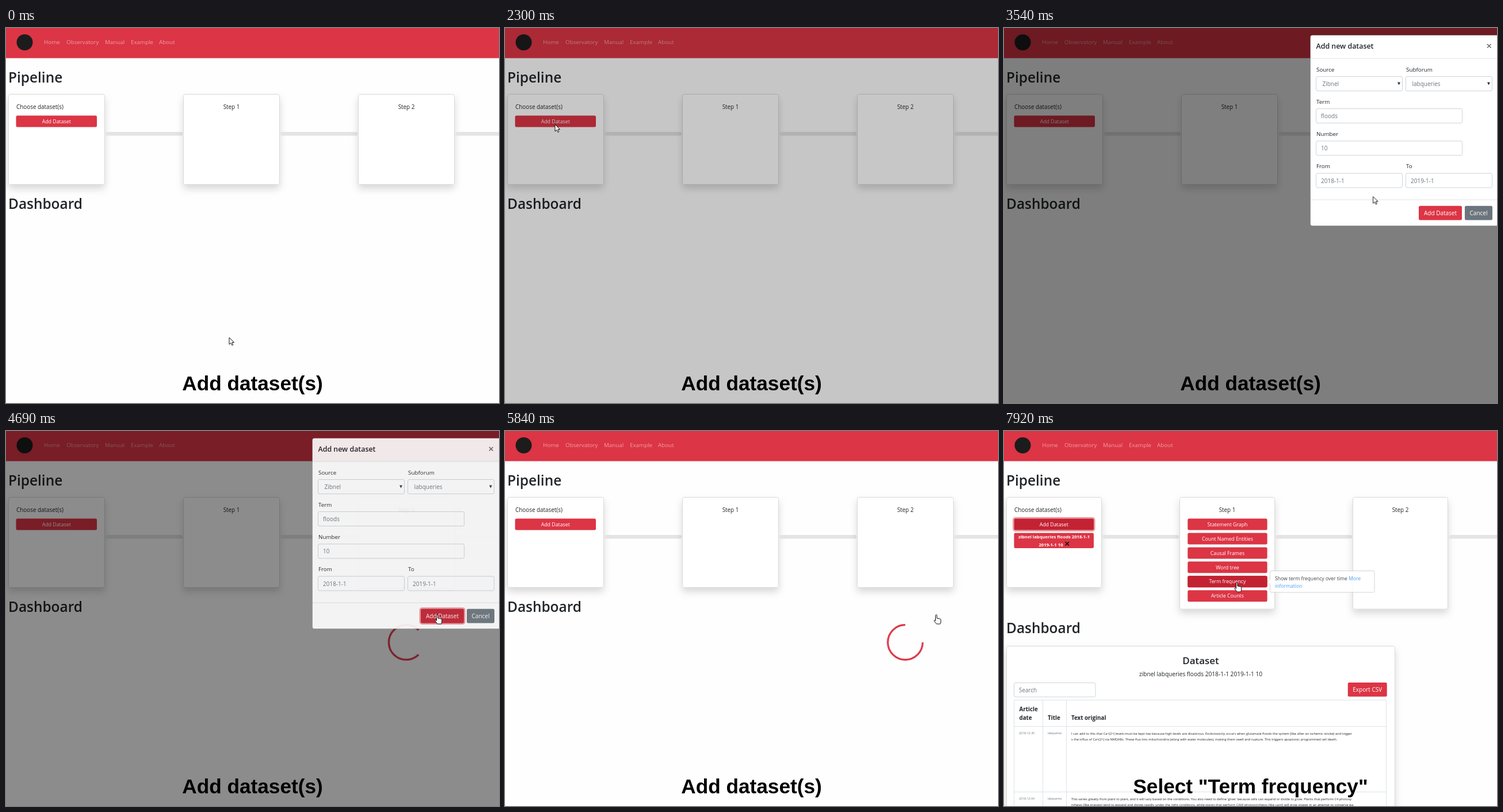
Write an HTML page that moves like this. It is 857 px wide and 653 px high and loops after 8 s.

```html
<!DOCTYPE html>
<html lang="en">
<head>
<meta charset="utf-8">
<title>Add dataset(s)</title>
<style>
  html, body { margin: 0; width: 100%; height: 100%; overflow: hidden; background: #fefefe; }
  svg { display: block; width: 100vw; height: 100vh; font-family: 'Open Sans', 'Noto Sans', sans-serif; }
  text { fill: #212529; white-space: pre; }
  .mid { text-anchor: middle; }
  .semi { font-weight: 600; }
  .bold { font-weight: 700; }
  .light { fill: #fff; }
  .muted { fill: #6c757d; }
  .link { fill: #2b8fee; }
  .nav { fill: #fff; fill-opacity: .52; }
  .caption { font: bold 35.2px 'Liberation Sans', Arial, sans-serif; fill: #000; text-anchor: middle; }
  .box { fill: #fff; stroke: #ced4da; }
  .rule { fill: none; stroke: #dee2e6; }
  .red { fill: #dc3545; }
  .dark { fill: #c32232; }
  .ring { fill: none; stroke: #dc3545; stroke-opacity: .5; stroke-width: 2.6; }
  .pointer { fill: #fff; stroke: #111; stroke-width: 1; stroke-linejoin: round; }
</style>
</head>
<body>
<script>
const LOOP = 8000;
const SITE = 'Zibnel', BOARD = 'labqueries';
const QUERY = `${SITE.toLowerCase()} ${BOARD} floods 2018-1-1`;

const text = (str, x, y, size, cls = '') =>
  `<text x="${x}" y="${y}" font-size="${size}" class="${cls}">${str}</text>`;
const rect = (x, y, w, h, cls, r = 2.5) =>
  `<rect x="${x}" y="${y}" width="${w}" height="${h}" rx="${r}" class="${cls}"/>`;
const path = (d, attrs) => `<path d="${d}" ${attrs}/>`;
const group = (id, ...parts) => `<g id="${id}">${parts.join('')}</g>`;
const button = (label, x, y, w, h, size, cls = 'red') =>
  rect(x, y, w, h, cls) + text(label, x + w / 2, y + h / 2 + size * .36, size, 'light mid');
const ring = (x, y, w, h) => rect(x - 1.2, y - 1.2, w + 2.4, h + 2.4, 'ring', 3.5);
const card = (x, y, w, h) =>
  `<rect x="${x}" y="${y}" width="${w}" height="${h}" rx="3" fill="#fff" stroke="#dadada" filter="url(#shadow)"/>`;
const field = (label, value, x, y, w) =>
  text(label, x, y - 8.5, 9.8) + rect(x - .5, y + .5, w, 25, 'box') +
  text(value, x + 8, y + 17, 10, 'muted');
const select = (label, value, x, y) =>
  field(label, '', x, y, 150) + text(value, x + 10.5, y + 17, 10, 'muted') +
  path(`M${x + 141} ${y + 10.5}h5l-2.5 5z`, 'fill="#333"');

function pipeline(width, pitch, stepHeight) {
  const cards = [0, 1, 2].map(i => {
    const x = 4.5 + i * pitch;
    return card(x, 115.5, width, i ? stepHeight : 157) +
      rect(x + width + 1.5, 181, pitch - width - 3, 6.5, 'track', 3).replace('class="track"', 'fill="#e4e4e4"') +
      (i ? text(`Step ${i}`, x + width / 2, 141, 9.9, 'mid') : text('Choose dataset(s)', 18, 141, 9.9));
  });
  return cards.join('');
}

function header() {
  const links = { Home: 66, Observatory: 105, Manual: 172, Example: 217, About: 266 };
  return '<rect width="857" height="52.5" fill="#dc3545"/><circle cx="32.5" cy="25" r="14" fill="#1c1c1c"/>' +
    Object.entries(links).map(([name, x]) => text(name, x, 28, 9.8, 'nav')).join('') +
    text('Pipeline', 4, 95, 24.4, 'semi');
}

const before = () => group('before',
  pipeline(167, 304, 157),
  button('Add Dataset', 17.5, 152.5, 140.5, 20, 8.8),
  group('hover', button('Add Dataset', 17.5, 152.5, 140.5, 20, 8.8, 'dark')),
  group('focus', ring(17.5, 152.5, 140.5, 20)),
  text('Dashboard', 4, 315, 24.4, 'semi'));

function tableRow(y, date, lines) {
  return text(date, 26, y - 1, 5.2, 'muted') + text(BOARD, 76, y - 1, 5, 'muted') +
    lines.map((line, i) => text(line, 117, y + i * 10, 5.7)).join('');
}

function after() {
  const tools = ['Statement Graph', 'Count Named Entities', 'Causal Frames', 'Word tree', 'Term frequency', 'Article Counts'];
  const tool = (i, cls) => button(tools[i], 319.3, 152.5 + i * 24.95, 138.3, 20, 8.75, cls);
  return group('after',
    pipeline(165, 301, 194.5),
    button('Add Dataset', 17.5, 152.5, 138.5, 20, 8.8, 'dark'), ring(17.5, 152.5, 138.5, 20),
    rect(17.5, 177.5, 138.5, 26.5, 'red'),
    text(QUERY, 87, 186.5, 7.7, 'light bold mid'),
    text('2019-1-1 10', 81.5, 200.7, 7.7, 'light bold mid'),
    path('M106.5 193l6.5 6.5m0-6.5l-6.5 6.5', 'stroke="#111" stroke-width="1.7"'),
    tools.map((_, i) => tool(i)).join(''),
    group('toolHover', tool(4, 'dark')),
    text('Dashboard', 4, 352, 24.4, 'semi'),
    card(4.5, 374.5, 675, 320),
    text('Dataset', 342, 406, 17, 'semi mid'),
    text(`${QUERY} 2019-1-1 10`, 342, 427, 10.15, 'mid'),
    rect(17.5, 438.5, 141.5, 24.5, 'box'), text('Search', 26, 454.7, 9.9, 'muted'),
    button('Export CSV', 597.7, 438, 68, 24.5, 10),
    path('M17.5 700V468.5H664.5V700M67.5 468.5V700M108.5 468.5V700M17.5 514.5H664.5M17.5 628.5H664.5', 'class="rule"'),
    text('Article', 26.5, 488, 9.8, 'bold'), text('date', 26.5, 503, 9.8, 'bold'),
    text('Title', 76, 503, 9.8, 'bold'), text('Text original', 117, 503, 9.8, 'bold'),
    tableRow(529, '2018-12-30', [
      'I can add to this that Ca^(2+) levels must be kept low because high levels are disastrous. Excitotoxicity occurs when glutamate floods the system (like after an ischemic stroke) and trigger',
      's the influx of Ca^(2+) via NMDARs. These flux into mitochondria (along with water molecules), making them swell and rupture. This triggers apoptosis: programmed cell death.']),
    tableRow(643, '2018-12-04', [
      "This varies greatly from plant to plant, and it will vary based on the conditions. You also need to define 'grow' because cells can expand or divide to grow. Plants that perform C4 photosy",
      'nthesis (like grasses) tend to expand and divide rapidly under the right conditions, while plants that perform CAM photosynthesis (like cacti) will grow slower in an attempt to conserve wa']),
    group('tooltip',
      path('M465 243.5H641.5q2.5 0 2.5 2.5V278.5q0 2.5-2.5 2.5H465q-2.5 0-2.5-2.5V267l-4.5-4.5 4.5-4.5V246q0-2.5 2.5-2.5z', 'fill="#fff" stroke="#ccc"'),
      text('Show term frequency over time <tspan class="link">More</tspan>', 471, 260, 8.6),
      text('information', 471, 273, 8.6, 'link')));
}

const modal = () => group('modal',
  path('M860 12.5H536q-3.5 0-3.5 3.5V341q0 3.5 3.5 3.5H860z', 'fill="#fff" stroke="#000" stroke-opacity=".2"'),
  path('M533 53H857M533 299H857', 'class="rule"'),
  text('Add new dataset', 542.5, 36, 12.4, 'semi'),
  path('M840 28l6.5 6.5m0-6.5l-6.5 6.5', 'stroke="#666" stroke-width="1.5"'),
  select('Source', SITE, 543, 84), select('Subforum', BOARD, 699, 84),
  field('Term', 'floods', 543, 140, 254),
  field('Number', '10', 543, 196.3, 254),
  field('From', '2018-1-1', 543, 252.5, 150), field('To', '2019-1-1', 699, 252.5, 150),
  button('Add Dataset', 721, 309.7, 75, 24.8, 10),
  group('submitHover', button('Add Dataset', 721, 309.7, 75, 24.8, 10, 'dark')),
  group('submitFocus', ring(721, 309.7, 75, 24.8)),
  button('Cancel', 801, 309.7, 48, 24.8, 10, 'muted'));

const cursor = () => group('cursor',
  group('arrow', path('M0 0V12L2.9 9.4L4.9 13.6L6.8 12.7L4.9 8.6H8.6Z', 'class="pointer"')),
  group('hand', path('M-1.5 9V1.2a1.2 1.2 0 0 1 2.4 0V6l5.4 1.1q1.4.3 1.4 1.8V12q0 2-1.2 4H.2L-3.8 11q-.8-1.4.4-1.8t1.9 1.2z', 'class="pointer"')));

document.body.innerHTML = `<svg viewBox="0 0 857 653">
  <defs><filter id="shadow" x="-20%" y="-20%" width="140%" height="150%">
    <feDropShadow dx="0" dy="7" stdDeviation="6.5" flood-opacity=".15"/></filter></defs>
  ${header()}${before()}${after()}
  <g id="loading"><g transform="translate(695.7 368)"><circle id="spinner" r="30.3" fill="none"
    stroke="#dc3545" stroke-width="3.2" pathLength="4" stroke-dasharray="3 1"/></g></g>
  <rect id="backdrop" width="857" height="653"/>
  ${modal()}${cursor()}
  ${group('addCaption', '<text class="caption" x="428.5" y="631">Add dataset(s)</text>')}
  ${group('selectCaption', '<text class="caption" x="428.5" y="631">Select "Term frequency"</text>')}
</svg>`;

// Each track lists [ms, css]; values hold until the next entry unless it sets its own timing.
const style = document.head.appendChild(document.createElement('style'));
function track(id, stops) {
  const frames = stops.map(([ms, css]) => `${ms / LOOP * 100}%{${css}}`).join('');
  style.append(`@keyframes ${id}{${frames}100%{${stops.at(-1)[1]}}}
    #${id}{animation:${id} ${LOOP}ms step-end infinite}`);
}
const opacity = (id, ...stops) => track(id, stops.map(([ms, value]) => [ms, `opacity:${value}`]));
const show = (id, ...spans) =>
  opacity(id, ...(spans[0][0] ? [[0, 0]] : []), ...spans.flatMap(([from, to]) => to ? [[from, 1], [to, 0]] : [[from, 1]]));
const at = (x, y, steps) =>
  `transform:translate(${x}px,${y}px);animation-timing-function:${steps ? `steps(${steps},start)` : 'step-end'}`;
const slide = (y, alpha) => `transform:translateY(${y}px);opacity:${alpha}`;

track('cursor', [
  [0, at(388, 539)], [520, at(388, 539, 11)], [1360, at(115, 212, 5)], [1740, at(87, 168)],
  [2840, at(87, 168, 11)], [3690, at(697, 306, 5)], [4080, at(750, 320)],
  [6850, at(737, 318)], [6920, at(737, 318, 10)], [7690, at(430, 268, 4)], [7980, at(405, 264)]
]);
show('hand', [1640, 2230], [3850, 6850], [7610]);
opacity('arrow', [0, 1], [1640, 0], [2230, 1], [3850, 0], [6850, 1], [7610, 0]);
show('hover', [1640, 2230]);
show('focus', [2080, 2230]);
show('submitHover', [3850, 4840]);
show('submitFocus', [4530, 4840]);
opacity('backdrop', [0, 0], [2230, .08], [2300, .22], [2380, .38], [2460, .5], [4690, .45], [4760, .2], [4840, 0]);
track('modal', [
  [0, slide(-44, 0)], [2460, slide(-25, .4)], [2540, slide(-9.5, .9)], [2610, slide(-3, 1)],
  [2690, slide(0, 1)], [4690, slide(0, .9)], [4760, slide(-20, .4)], [4840, slide(-44, 0)]
]);
show('loading', [4610, 6070]);
track('spinner', [
  [0, 'transform:rotate(-45deg)'],
  [4540, 'transform:rotate(-45deg);animation-timing-function:steps(22)'],
  [6190, 'transform:rotate(945deg)']
]);
show('before', [0, 6070]);
show('after', [6070]);
show('toolHover', [7610]);
opacity('tooltip', [0, 0], [7690, .3], [7767, .6], [7840, .85]);
show('addCaption', [0, 6920]);
show('selectCaption', [6920]);
</script>
</body>
</html>
```
